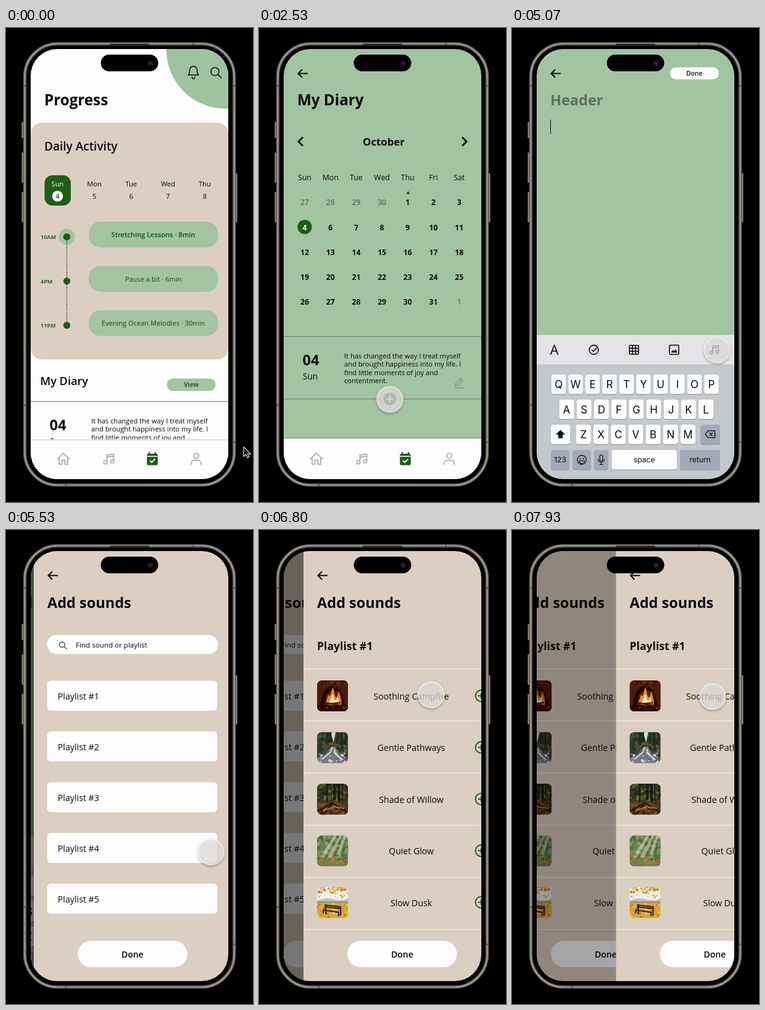
An HTML page for the animation above (8000 ms loop, 400 by 766 pixels).

```html
<!DOCTYPE html>
<html lang="en">
<head>
<meta charset="utf-8">
<title>Diary app walkthrough</title>
<style>
html, body { margin: 0; width: 100%; height: 100%; overflow: hidden; background: #000; }
svg { display: block; width: 100vw; height: 100vh; font-family: "Open Sans", "Noto Sans", sans-serif; }
.key { font-family: Inter, Roboto, sans-serif; }
</style>
</head>
<body>
<svg id="stage" viewBox="0 0 400 766"></svg>
<script>
const GREEN = '#1b5e16', SAGE = '#a3c4a0', SAND = '#dbcfc1', WHITE = '#fdfcfe', INK = '#0b0b0b';

// Markup helpers
const rect = (x, y, w, h, fill, r = 0, more = '') =>
  `<rect x="${x}" y="${y}" width="${w}" height="${h}" rx="${r}" fill="${fill}" ${more}/>`;
const disc = (x, y, r, fill, more = '') => `<circle cx="${x}" cy="${y}" r="${r}" fill="${fill}" ${more}/>`;
const line = (d, color, w = 1, more = '') => `<path d="${d}" fill="none" stroke="${color}" stroke-width="${w}" ${more}/>`;
const shape = (d, fill, more = '') => `<path d="${d}" fill="${fill}" ${more}/>`;
const text = (x, y, s, size, weight = 400, fill = INK, more = '') =>
  `<text x="${x}" y="${y}" font-size="${size}" font-weight="${weight}" fill="${fill}" ${more}>${s}</text>`;
const mid = (x, y, s, size, weight, fill, more = '') => text(x, y, s, size, weight, fill, 'text-anchor="middle" ' + more);
const at = (x, y, s, k = 1) => `<g transform="translate(${x} ${y}) scale(${k})">${s}</g>`;
const times = (n, f) => Array.from({ length: n }, (_, i) => f(i)).join('');
const ROUND = 'stroke-linecap="round" stroke-linejoin="round"';

// Icons, centred on 0,0
const bell = line('M-7.5 4.5H7.5C5.6 2.5 5.4 0 5.4-3A5.4 5.4 0 0 0-5.4-3C-5.4 0-5.6 2.5-7.5 4.5zM-2 8a2 2 0 0 0 4 0', INK, 1.4, ROUND);
const lens = disc(-1.5, -1.5, 6, 'none', `stroke="${INK}" stroke-width="1.4"`) + line('M3 3L8 8', INK, 1.4, ROUND);
const back = line('M8 0H-7.5M-1-6.5L-7.5 0L-1 6.5', INK, 2, 'stroke-linejoin="miter"');
const note = c => line('M-3.5 4.5V-7L7.5-8.5V3M-3.5-3.5L7.5-5', c, 1.9, ROUND) +
  disc(-6, 4.8, 2.7, 'none', `stroke="${c}" stroke-width="1.9"`) + disc(5, 3.2, 2.7, 'none', `stroke="${c}" stroke-width="1.9"`);
const house = line('M-9.5 0L0-8.8L9.5 0M-7-2V9H-2.5V2.5H2.5V9H7V-2', '#b4b4b6', 2, ROUND);
const person = disc(0, -4.6, 4.1, 'none', 'stroke="#b4b4b6" stroke-width="2"') +
  line('M-8 9V7.2C-8 3.5-4.5 2.6-2.5 2.6H2.5C4.5 2.6 8 3.5 8 7.2V9', '#b4b4b6', 2, ROUND);
const agenda = rect(-8.8, -8.5, 17.6, 18.5, GREEN, 2.5) + line('M-5-11V-7M5-11V-7', GREEN, 2.4) +
  line('M-8.8-4.2H8.8', WHITE, 1.6) + line('M-4 2.4L-1 5.4L4.4 0', WHITE, 2);
const pencil = line('M-6 5V2L3-7L6-4L-3 5zM1-5L4-2M-7 8.5H7', '#8b8f90', 1.5, ROUND);
const plusRing = disc(0, 0, 9.2, 'none', `stroke="${GREEN}" stroke-width="1.9"`) + line('M-5 0H5M0-5V5', GREEN, 1.9);

const page = fill => rect(40, 34, 320, 695, fill);

const tabs = (y, edge) => rect(40, y, 320, 729 - y, WHITE) + rect(40, y - 1, 320, 2, edge) +
  at(93, 696, house) + at(167, 697, note('#b4b4b6')) + at(237, 696.5, agenda) + at(308, 696, person);

const entry = y => {
  const lines = ['It has changed the way I treat myself', 'and brought happiness into my life. I',
    'find little moments of joy and', 'contentment.'];
  return line(`M40 ${y}H360`, '#6f8270') + mid(84, y + 46, '04', 23.6, 700) + mid(83, y + 69.5, 'Sun', 13.6) +
    times(4, i => text(138, y + 35.2 + i * 13.4, lines[i], 11.1));
};

function progress() {
  const days = ['Sun', 'Mon', 'Tue', 'Wed', 'Thu'], hours = ['10AM', '4PM', '11PM'];
  const plans = ['Stretching Lessons · 8min', 'Pause a bit · 6min', 'Evening Ocean Melodies · 30min'];
  return page(WHITE) + disc(355, 35, 95.3, '#a0c39f') + at(303.5, 71, bell, 1.1) + at(340, 72, lens, 1.08) +
    text(62, 125, 'Progress', 24.2, 700) +
    rect(40, 153, 320, 382.5, SAND, 18) + text(62, 198, 'Daily Activity', 19, 600) +
    rect(62.5, 238, 42.5, 49, GREEN, 12.5) + disc(83.5, 271.7, 8.8, WHITE) +
    times(5, i => mid(83.5 + i * 59.6, 256.3, days[i], 11.2, 400, i ? INK : WHITE) +
      mid(83.5 + i * 59.6, 275.8, 4 + i, 11.2)) +
    disc(98.5, 337.5, 13, SAGE) +
    line('M98.5 337V481', '#222', 1.3, 'stroke-dasharray="1.6 1.8"') +
    times(3, i => disc(98.5, 337.5 + i * 71.5, 5.7, GREEN) +
      text(56, 341 + i * 71.5, hours[i], 9, 700, '#2d6626') +
      rect(134, 313 + i * 71.5, 209.5, 41.8, SAGE, 19) +
      mid(238.5, 338 + i * 71.5, plans[i], 11.1, i ? 400 : 600, '#174a14')) +
    text(55.5, 577, 'My Diary', 18.1, 600) +
    rect(260.5, 566.5, 79, 20, SAGE, 9.8) + mid(300, 580.3, 'View', 10.6, 600, '#174a14') +
    entry(603.5) + tabs(665.5, '#dddcde');
}

function diary() {
  const week = ['Sun', 'Mon', 'Tue', 'Wed', 'Thu', 'Fri', 'Sat'];
  const day = i => {
    const n = i - (i > 7 ? 2 : 3), out = n < 1 || n > 31;
    return mid(74 + i % 7 * 41.7, 286.3 + Math.floor(i / 7) * 40.2, n < 1 ? n + 30 : n > 31 ? n - 31 : n,
      12.2, out ? 600 : 700, i === 7 ? WHITE : out ? '#5d6f5c' : INK);
  };
  return page(SAGE) + at(71, 73.5, back) + text(62, 125, 'My Diary', 24.2, 700) +
    line('M71 176.5L64 183.5L71 190.5M329 176.5L336 183.5L329 190.5', INK, 2.7) +
    mid(202, 190.3, 'October', 16.8, 700) +
    times(7, i => mid(74 + i * 41.7, 245.8, week[i], 12.3)) +
    disc(241.5, 266.5, 2.3, GREEN) + disc(74, 321.5, 11.6, GREEN) + times(35, day) +
    entry(498.5) + at(324, 573, pencil) + line('M40 599.5H360', '#6f8270') +
    disc(212, 599.5, 10.4, GREEN) + line('M206.5 599.5H217.5M212 594V605', WHITE, 1.7) +
    tabs(662.5, '#8eaa8c');
}

function editor() {
  const key = (x, y, w, label, fill = '#fefefe', size = 17) => rect(x, y + 1.2, w, 31.4, '#8b8d91', 4) +
    rect(x, y, w, 31.4, fill, 4) + mid(x + w / 2, y + 16 + size * .36, label, size, 400, INK, 'class="key"');
  const row = (s, x, gap, w, y) => times(s.length, i => key(x + i * gap - w / 2, y, w, s[i]));
  const GREY = '#a4a9b7', ring = `stroke="${INK}" stroke-width="1.6"`;
  const check = disc(0, 0, 7.4, 'none', ring) + line('M-3.3 0L-.8 2.6L5-3.4', INK, 1.6);
  const grid = rect(-7.3, -7.3, 14.6, 14.6, 'none', 1.5, ring) + line('M-2.4-7V7M2.4-7V7M-7-2.4H7M-7 2.4H7', INK, 1.6);
  const picture = rect(-7.5, -7.5, 15, 15, 'none', 1.5, ring) + shape('M-5 4.5L-2 .2L0 2.6L2.4-1L5.5 4.5z', INK);
  const smile = disc(0, 0, 7.3, 'none', `stroke="${INK}" stroke-width="1.2"`) + disc(-2.6, -2, 1, INK) + disc(2.6, -2, 1, INK) +
    line('M-4.5 1.2H4.5A4.5 4.5 0 0 1-4.5 1.2z', INK, 1.1);
  const mic = rect(-2.4, -8, 4.8, 10, 'none', 2.4, `stroke="${INK}" stroke-width="1.2"`) + line('M-5-1.5A5 5.5 0 0 0 5-1.5M0 4V7.5M-3 7.5H3', INK, 1.2);
  const erase = line('M-8 0L-3.5-5.6H7.5V5.6H-3.5zM-1.2-2.6L4 2.6M4-2.6L-1.2 2.6', INK, 1.3);
  return page(SAGE) + at(71, 73.5, back) + rect(256, 63.5, 79, 19.6, WHITE, 9.8) + mid(295.3, 77, 'Done', 10.2, 600) +
    text(62, 125, 'Header', 23.5, 700, '#5f6f5e') + line('M62.5 148V171', INK) +
    rect(40, 496, 320, 48, '#e5e2e5') + rect(40, 543.5, 320, 186, '#c2c8cc') +
    mid(68.5, 528, 'A', 22, 400) + at(132.5, 520, check) + at(197.5, 520, grid) + at(262.5, 520, picture) +
    at(328, 520.5, note(INK), .85) +
    row('QWERTYUIOP', 75.5, 27.5, 23.4, 560) + row('ASDFGHJKL', 88.5, 28.2, 24, 600.5) + row('ZXCVBNM', 115.8, 28.2, 24, 641) +
    key(63, 641, 31, '') + shape('M78.5 649.5L86 657H82V663H75V657H71z', INK) +
    key(305.5, 641, 31.5, '', GREY) + at(321, 656.5, erase) +
    key(63, 682, 30, '123', GREY, 12) + key(98, 682, 30, '', GREY) + at(113, 698, smile) +
    key(133, 682, 23, '', GREY) + at(144.5, 698, mic) +
    key(161.5, 682, 105.5, 'space', '#fefefe', 12) + key(272, 682, 65, 'return', GREY, 12);
}

const soundsPage = body => page(SAND) + at(71, 73.5, back) + text(62, 126.3, 'Add sounds', 23.5, 700) + body +
  rect(111, 664, 177.5, 42.5, WHITE, 21.2) + mid(199.8, 691, 'Done', 14, 600);

const sounds = () => soundsPage(
  rect(61.5, 169.7, 277, 30.5, WHITE, 15.2) + at(87, 186.3, lens, .72) + text(108, 190, 'Find sound or playlist', 11.6) +
  times(5, i => rect(61.5, 243.5 + i * 82, 275.5, 48.5, WHITE, 6) + text(78.8, 273.8 + i * 82, 'Playlist #' + (i + 1), 14.2)));

// Thumbnails, 50 by 50, softened by a blur
let seed = 7;
const rnd = (a, b) => {
  seed = seed * 16807 % 2147483647;
  return (a + (b - a) * seed / 2147483647).toFixed(1);
};
const specks = (n, top, bottom, r, ...colors) =>
  times(n, i => disc(rnd(0, 50), rnd(top, bottom), rnd(r * .5, r), colors[i % colors.length]));
const trunks = (n, bottom, color) => times(n, () => rect(rnd(0, 49), 0, rnd(.8, 2.2), rnd(bottom - 6, bottom), color));

const fire = () => rect(0, 0, 50, 50, '#1d0704') + shape('M0 0H50V40H45Q40 9 25 9T5 40H0z', '#4d1a0d') +
  specks(22, 0, 10, 2.5, '#6b2913', '#32100a', '#5a2110') + disc(27, 29, 13, '#8a2c07', 'opacity=".6"') +
  shape('M12 40C14 33 17 31 18 23C21 28 22 24 25 11C29 17 27 24 31 28C34 25 33 21 36 17C36 27 41 32 39 40z', '#ee8526') +
  shape('M18 38C20 34 22 33 25 21C28 27 27 31 30 33L34 27C34 32 36 36 35 38z', '#fff0b8') +
  line('M11 39L38 36M13 36L40 41', '#45180a', 2.6) + rect(0, 44, 50, 6, '#2c0d06') + specks(8, 42, 46, 1.3, '#c4551a', '#6e260d');

const creek = () => rect(0, 0, 50, 50, '#2c3a2a') + specks(50, 0, 30, 4, '#26382a', '#3c5236', '#1b2a1e', '#54492c') +
  shape('M21 0H30L27 16z', '#d5ddd8') + trunks(9, 24, '#18241a') + specks(8, 14, 24, 2, '#7d5527', '#8a4b22') +
  shape('M22 24H29L36 33L50 42V50H0V42L16 33z', '#767a80') +
  specks(34, 31, 50, 2.6, '#a9adb2', '#5a5f66', '#d3d6da', '#484d52') +
  line('M25 24L21 33L8 44M28 27L30 36L42 45', '#dfe2e6', 1.8);

const woods = () => rect(0, 0, 50, 50, '#343a20') + specks(50, 0, 26, 4, '#2b3a20', '#4d552b', '#222a18', '#6f7038') +
  rect(0, 29, 50, 21, '#5f3d1e') + trunks(11, 31, '#1b1a10') +
  specks(30, 29, 50, 3, '#3a2613', '#86572a', '#4a2f17') + line('M0 45L25 31L50 47M10 50L26 31', '#20160c', 2.2) +
  line('M10 44L27 37L44 40', '#b98445', 1.5);

const glade = () => rect(0, 0, 50, 50, '#6d8056') + specks(45, 0, 34, 5, '#5b754a', '#7f9062', '#4d683f', '#8d9a6c') +
  shape('M27 0H32L12 36H5zM36 0H40L24 36H17zM44 0H47L36 36H29z', '#dcd8ab', 'opacity=".55"') +
  specks(50, 32, 50, 2.4, '#647a3e', '#cf7c2d', '#8d8a44', '#4d6a35', '#c35a2a');

const bench = () => rect(0, 0, 50, 50, '#eceef0') + shape('M0 22Q14 16 27 20T50 18V27H0z', '#b9bfc0') +
  rect(0, 25, 50, 25, '#dba53a') + rect(0, 23, 50, 3, '#a79a52') +
  specks(45, 26, 50, 2.2, '#e9b840', '#c98c25', '#f0cb62', '#b9781f') +
  specks(30, 0, 9, 2.6, '#e6a530', '#c9841f', '#f0be57') + specks(10, 8, 17, 1.6, '#dd9b2b', '#eab44c') +
  line('M12 29L39 32M12 32L39 35M10 37L36 41M14 28V44M38 31V46M10 37V42M35 40V47', '#2c1d12', 2);

const thumbs = [fire, creek, woods, glade, bench].map(f => f());

const playlist = () => {
  const names = ['Soothing Campfire', 'Gentle Pathways', 'Shade of Willow', 'Quiet Glow', 'Slow Dusk'];
  return soundsPage(text(62, 194, 'Playlist #1', 17.6, 700) +
    times(6, i => line(`M40 ${224.5 + i * 84.2}H360`, '#f5f0ea', 1.2)) +
    times(5, i => `<g transform="translate(62 ${243 + i * 83.5})" clip-path="url(#thumb)"><g filter="url(#soft)">${thumbs[i]}</g></g>` +
      mid(214.5, 273.7 + i * 83.5, names[i], 14.1) + at(327.7, 268 + i * 83.4, plusRing)));
};

const views = [progress, diary, editor, sounds, playlist, playlist];

const body = rect(25.5, 152, 4, 26, '#8b877b', 1) + rect(25.5, 201, 4, 49, '#8b877b', 1) + rect(25.5, 265, 4, 49, '#8b877b', 1) +
  rect(370.5, 235, 4, 79, '#8b877b', 1) +
  rect(28.5, 23.5, 343, 717, '#000', 55, 'stroke="#5c594f" stroke-width="1.6"') +
  rect(30.5, 25.5, 339, 713, '#000', 53, 'stroke="#a5a194" stroke-width="2.6"') +
  rect(32.6, 27.6, 334.8, 708.8, '#000', 51, 'stroke="#4b4840" stroke-width="1.6"') +
  line('M28 93.5H32M368 93.5H372M28 609.5H32M368 669.5H372M97 737V741M303 23V27', '#5a574d', 2.6) +
  rect(168, 25.5, 64, 2.2, '#1c1b19', 1);
const island = rect(153.5, 43, 93, 27, '#000', 13.5) + disc(233.5, 57, 5, '#15171b') + disc(233.5, 57, 2, '#292d38');

const stage = document.getElementById('stage');
stage.innerHTML = `<defs>
  <clipPath id="screen">${rect(40, 34, 320, 695, '#000', 43)}</clipPath>
  <clipPath id="thumb">${rect(0, 0, 50.3, 50.3, '#000', 7.5)}</clipPath>
  <filter id="soft"><feGaussianBlur stdDeviation=".55"/></filter></defs>
  ${rect(-400, -766, 1200, 2298, '#000')}${body}
  <g clip-path="url(#screen)">${views.map(v => `<g class="view">${v()}${page('#000')}</g>`).join('')}</g>${island}
  <g id="touch" style="filter:drop-shadow(0 2px 2px rgba(0,0,0,.35))">${disc(0, 0, 21, '#efeeec', 'fill-opacity=".7" stroke="#fff" stroke-opacity=".8" stroke-width="1.2"')}</g>
  <g id="arrow">${shape('M0 0V15.5L3.6 12.2L6 17.6L8.6 16.4L6.2 11.2H11z', '#000', 'stroke="#fff" stroke-width="1.1"')}</g>`;

const groups = [...stage.querySelectorAll('.view')];
const touch = document.getElementById('touch'), arrow = document.getElementById('arrow');

const LOOP = 8000, SLIDE = 500;
const taps = [800, 2700, 5068, 6399, 7648];
const path = [[0, 385, 677], [370, 385, 677], [700, 302, 577], [1000, 302, 577], [1300, 311, 574], [1800, 311, 574],
  [2450, 212, 600], [3750, 212, 600], [4700, 332, 520], [5620, 332, 520], [6270, 277, 266], [6750, 277, 266],
  [7200, 325, 275], [7420, 325, 275], [7620, 325, 269], [LOOP, 325, 269]];

const ease = u => { u = Math.min(1, Math.max(0, u)); return u * u * (3 - 2 * u); };

function pointer(t) {
  const i = path.findIndex(p => p[0] > t), [t0, x0, y0] = path[i - 1], [t1, x1, y1] = path[i];
  const k = ease((t - t0) / (t1 - t0));
  return [x0 + (x1 - x0) * k, y0 + (y1 - y0) * k];
}

function draw(t) {
  groups.forEach((g, i) => {
    const enter = i ? ease((t - taps[i - 1]) / SLIDE) : 1;
    const leave = i < taps.length ? ease((t - taps[i]) / SLIDE) : 0;
    g.style.display = enter > 0 && leave < 1 ? '' : 'none';
    g.setAttribute('transform', `translate(${320 * (1 - enter) - 80 * leave} 0)`);
    g.lastChild.setAttribute('opacity', .585 * leave);
  });
  const [x, y] = pointer(t), outside = x > 372;
  arrow.style.display = outside ? '' : 'none';
  touch.style.display = outside ? 'none' : '';
  (outside ? arrow : touch).setAttribute('transform', `translate(${x} ${y})`);
}

const start = performance.now();
function tick() {
  draw((performance.now() - start) % LOOP);
  requestAnimationFrame(tick);
}
tick();
</script>
</body>
</html>
```
